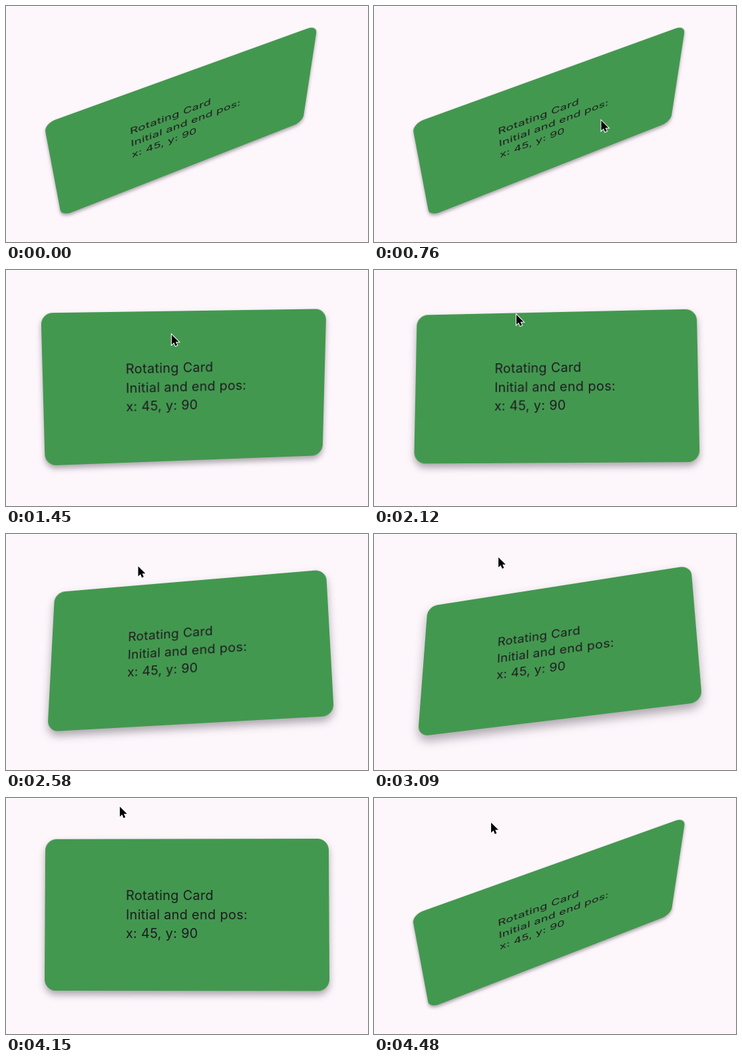
Write an HTML page that moves like this. It is 544x354 px and loops after 4510 ms.

```html
<!DOCTYPE html>
<html lang="en">
<head>
<meta charset="utf-8">
<title>Rotating Card</title>
<style>
  html, body { margin: 0; width: 100%; height: 100%; overflow: hidden; background: #fdf7fc; }
  #shade { position: absolute; left: 0; top: 0; width: 544px; height: 354px; }
  #card {
    position: absolute; left: 57.5px; top: 61px; width: 427px; height: 228px;
    border-radius: 17px; background: #43984f; color: #1d1b20;
    display: flex; align-items: center; justify-content: center;
    font: 19.92px/28.4px Inter, Roboto, sans-serif; letter-spacing: .3px;
    white-space: pre;
  }
  #cursor { position: absolute; left: 0; top: 0; overflow: visible; }
</style>
</head>
<body>
<div id="shade"><div id="card">Rotating Card
Initial and end pos:
x: 45, y: 90</div></div>
<svg id="cursor" width="14" height="20">
  <path d="M0 0V15L3.4 11.8 5.7 17 8.3 15.9 6.1 10.8H10.8Z"
    stroke="#fff" stroke-width="2" paint-order="stroke"/>
</svg>
<script>
const LOOP = 4510, SHOW = 360, RELEASE = 4065, SETTLE = 495;
const REST = [-0.9, 0.45];

// time, pointer x, pointer y, card tilt about x, card tilt about y (radians)
const drag = [
  [360, 352, 184, ...REST],
  [760, 342, 172, ...REST],
  [850, 297, 159, ...REST],
  [1450, 249, 97, -0.18, 0.145],
  [2120, 214, 67, 0.135, -0.104],
  [2520, 200, 50, 0.335, -0.19],
  [3090, 187, 35, 0.505, -0.28],
  [3700, 171, 13, 0.76, -0.377],
  [4150, 171, 13, 0.76, -0.377],
  [4480, 176, 37, 0.76, -0.377]
];

const $ = id => document.getElementById(id);
const card = $('card'), shade = $('shade'), cursor = $('cursor');
const mix = (a, b, p) => a + (b - a) * p;

function sample(t) {
  const last = drag.length - 1;
  let i = 0;
  while (i < last - 1 && t >= drag[i + 1][0]) i++;
  const from = drag[i], to = drag[i + 1];
  const p = Math.min(1, Math.max(0, (t - from[0]) / (to[0] - from[0])));
  return from.map((v, k) => mix(v, to[k], p)).slice(1);
}

function draw(t) {
  let [x, y, ax, ay] = sample(t);
  // The return to rest runs on past the loop point.
  const back = t < SHOW ? t + LOOP : t;
  if (back > RELEASE) {
    const p = Math.min(1, (back - RELEASE) / SETTLE);
    const e = 1 - (1 - p) ** 3;
    ax = mix(0.76, REST[0], e);
    ay = mix(-0.377, REST[1], e);
  }
  card.style.transform = `perspective(1423px) rotateX(${ax}rad) rotateY(${ay}rad)`;
  const drop = 6.5 + 3.5 * ax, blur = 5 + 4 * ax + 1.5 * ax * ax;
  shade.style.filter = `drop-shadow(0 ${drop}px ${blur}px rgba(30,20,30,.36))`;
  cursor.style.display = t < SHOW ? 'none' : 'block';
  cursor.style.transform = `translate(${x}px,${y}px)`;
}

const start = performance.now();
function tick() {
  draw((performance.now() - start) % LOOP);
  requestAnimationFrame(tick);
}
tick();
</script>
</body>
</html>
```
